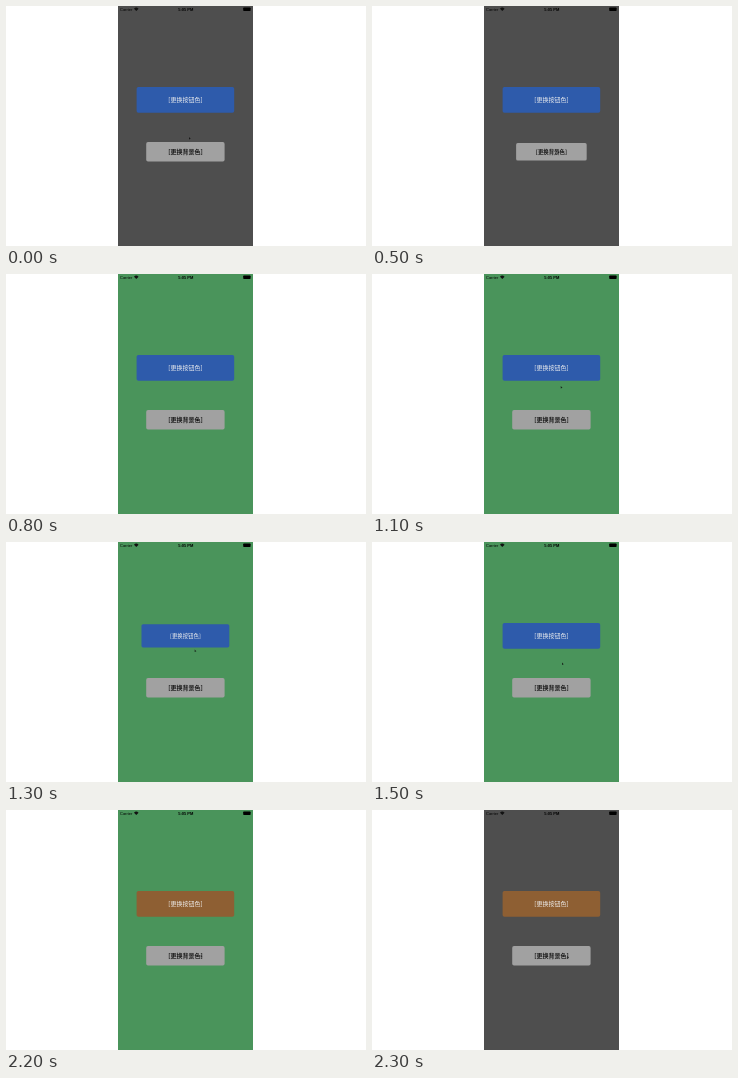
Animation, 360 px wide and 240 px high, one loop 2400 ms. Source, as an HTML page with a canvas:

```html
<!DOCTYPE html>
<html lang="zh">
<head>
<meta charset="utf-8">
<style>
html, body { margin: 0; width: 360px; height: 240px; overflow: hidden; background: #fff; }
canvas { display: block; }
</style>
</head>
<body>
<canvas width="360" height="240"></canvas>
<script>
const ctx = document.querySelector('canvas').getContext('2d');
const LOOP = 2400, STEP = 100;
const GREY = '#4e4e4e', GREEN = '#4a945b', BLUE = '#2e5bab', BROWN = '#8e5f33';

const mix = (a, b, k) => a + (b - a) * k;

// Shrinks to 90% at time `low` and comes back, 200 ms each way.
const press = (t, low) => 1 - .1 * Math.max(0, 1 - Math.abs(t - low) / 200);

// Key points of the pointer's path.
const PATH = [
  { t: 0, x: 183, y: 132 },
  { t: 500, x: 186, y: 146 },
  { t: 800, x: 191, y: 146 },
  { t: 1200, x: 188, y: 102 },
  { t: 1800, x: 192, y: 141 },
  { t: 2400, x: 196, y: 148 }
];

function pointerAt(t) {
  const i = PATH.findIndex(p => p.t > t);
  const a = PATH[i - 1], b = PATH[i];
  const k = (t - a.t) / (b.t - a.t);
  return [mix(a.x, b.x, k), mix(a.y, b.y, k)];
}

function label(text, x, y, font, color, align = 'center') {
  ctx.font = font;
  ctx.fillStyle = color;
  ctx.textAlign = align;
  ctx.textBaseline = 'middle';
  ctx.fillText(text, x, y);
}

function box(x, y, w, h, r, fill) {
  ctx.fillStyle = fill;
  ctx.beginPath();
  ctx.roundRect(x, y, w, h, r);
  ctx.fill();
}

function button(text, cx, cy, w, h, scale, fill, color, weight) {
  ctx.save();
  ctx.translate(cx, cy);
  ctx.scale(scale, scale);
  box(-w / 2, -h / 2, w, h, 1.8, fill);
  label(text, 0, 0, weight + ' 6px "Noto Sans CJK SC", "Noto Sans CJK", sans-serif', color);
  ctx.restore();
}

function statusBar() {
  label('Carrier', 114, 3.7, '4px "Liberation Sans", sans-serif', '#000', 'left');
  label('5:05 PM', 179.8, 3.7, 'bold 4px "Liberation Sans", sans-serif', '#000');
  ctx.fillStyle = '#111';
  ctx.beginPath();
  ctx.moveTo(130.3, 5);
  ctx.arc(130.3, 5, 3.2, -Math.PI * .76, -Math.PI * .24);
  ctx.fill();
  box(237.2, 1.6, 7.4, 3.3, .7, '#000');
}

function pointer(x, y) {
  ctx.fillStyle = 'rgba(15,15,15,.85)';
  ctx.beginPath();
  ctx.moveTo(x, y - 1);
  ctx.lineTo(x + 1.7, y + .8);
  ctx.lineTo(x, y + 1.4);
  ctx.fill();
}

function draw(now) {
  const t = Math.floor(now % LOOP / STEP) * STEP;
  const lower = Math.min(press(t, 500), press(t, 2000));
  ctx.fillStyle = '#fff';
  ctx.fillRect(0, 0, 360, 240);
  ctx.fillStyle = t >= 800 && t < 2300 ? GREEN : GREY;
  ctx.fillRect(112, 0, 135, 240);
  statusBar();
  button('[更换按钮色]', 179.4, 93.8, 97.6, 25.8, press(t, 1300), t < 1600 ? BLUE : BROWN, '#f0f0f0', 500);
  button('[更换背景色]', 179.4, 145.8, 78.4, 19.4, lower, '#a1a1a1', '#1c1c1c', 700);
  pointer(...pointerAt(t));
}

const start = performance.now();
function tick() {
  draw(performance.now() - start);
  requestAnimationFrame(tick);
}
tick();
</script>
</body>
</html>
```
